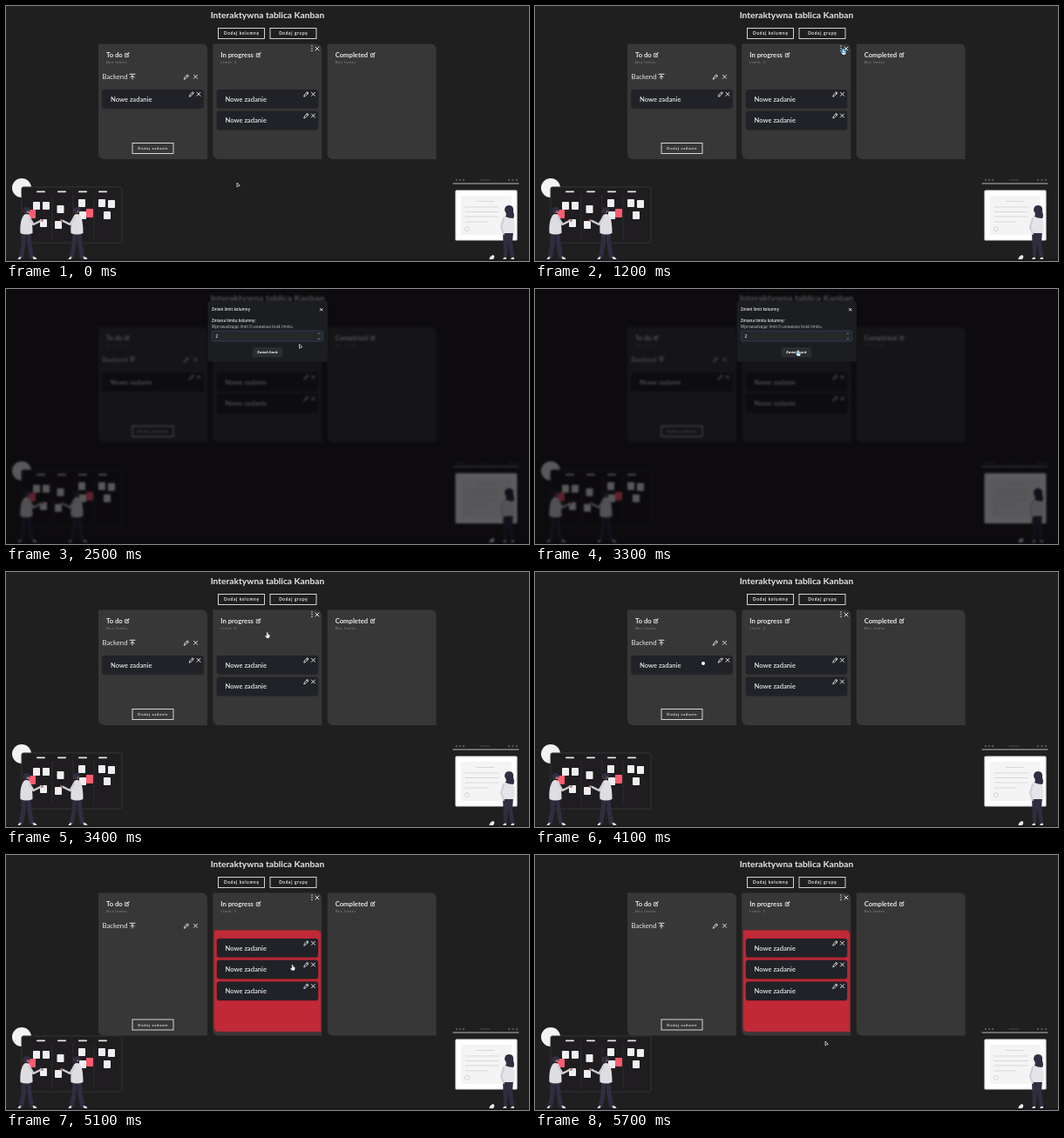
Write an HTML page that moves like this. It is 600 px wide and 293 px high and loops after 6.7 s.

```html
<!DOCTYPE html>
<html lang="pl">
<head>
<meta charset="utf-8">
<title>Interaktywna tablica Kanban</title>
<style>
html, body { margin: 0; width: 100%; height: 100%; overflow: hidden; background: #201f20; }
svg { display: block; width: 100%; height: 100%; font-family: Lato, sans-serif; }
.dimmed { filter: blur(1px); }
.modal { font-family: "Open Sans", sans-serif; }
</style>
</head>
<body>
<svg id="stage" viewBox="0 0 600 293"></svg>
<script>
const LOOP = 6700, STEP = 100;
const PITCH = 24.7, CARD_Y = 96;
const LIGHT = '#e6e6e6', NAVY = '#2f2e41', SKIN = '#a8777c', RED = '#ff5c70';
const stage = document.getElementById('stage');

const rect = (x, y, w, h, fill, extra = '') =>
  `<rect x="${x}" y="${y}" width="${w}" height="${h}" fill="${fill}" ${extra}/>`;
const circle = (x, y, r, fill, extra = '') =>
  `<circle cx="${x}" cy="${y}" r="${r}" fill="${fill}" ${extra}/>`;
const shape = (d, fill, extra = '') => `<path d="${d}" fill="${fill}" ${extra}/>`;
const line = (d, color, width, extra = '') =>
  shape(d, 'none', `stroke="${color}" stroke-width="${width}" stroke-linecap="round" stroke-linejoin="round" ${extra}`);
const text = (str, x, y, size, weight = 400, fill = LIGHT, extra = '') =>
  `<text x="${x}" y="${y}" font-size="${size}" font-weight="${weight}" fill="${fill}" ${extra}>${str}</text>`;
const at = (x, y, body, extra = '') => `<g transform="translate(${x} ${y})" ${extra}>${body}</g>`;

const cross = (x, y, r = 2, color = LIGHT) =>
  line(`M${x - r} ${y - r}l${2 * r} ${2 * r}m0 ${-2 * r}l${-2 * r} ${2 * r}`, color, 1);
const pencil = (x, y) => at(x, y, line('M-2.6 2.6l.5-1.8L1.2-2.5l1.3 1.3L-.8 2.1zM.4-1.7l1.3 1.3', LIGHT, .9));
const editIcon = (x, y) => at(x, y,
  line('M0-1.4h-2.2v3.9h3.9V.4', LIGHT, .8) + line('M-.4.7L2.3-2', LIGHT, 1.2));

// Piecewise eased track: rows of [time, ...values]
function track(rows, t) {
  const next = rows.findIndex(row => row[0] > t);
  if (next < 0) return rows.at(-1).slice(1);
  if (next === 0) return rows[0].slice(1);
  const a = rows[next - 1], b = rows[next];
  const k = (t - a[0]) / (b[0] - a[0]), ease = k * k * (3 - 2 * k);
  return a.slice(1).map((v, i) => v + (b[i + 1] - v) * ease);
}

const POINTER = [
  [0, 265, 203], [300, 265, 203], [1000, 354, 52], [1500, 354, 52],
  [1600, 351, 49], [2100, 359, 57], [2200, 359, 57], [2900, 302, 73], [3300, 302, 73],
  [3400, 300, 72], [3600, 300, 72], [4000, 193, 105], [4100, 193, 105],
  [4300, 218, 104], [4500, 301, 100], [4700, 325, 105], [4900, 325, 105],
  [5500, 340, 197], [5700, 333, 214]
];

// Room opening in the middle column for the dragged card
const GAP = [[4400, 0], [4500, 17], [4600, PITCH]];

function button(x, y, w, h, label, size) {
  return rect(x, y, w, h, 'none', `stroke="${LIGHT}" stroke-width=".9"`) +
    text(label, x + w / 2 + .3, y + h / 2 + 1.6, size, 700, LIGHT, 'text-anchor="middle" letter-spacing=".7"');
}

// Panel rounded at the top right and bottom left
function panel(x, y, w, h, r, fill, extra) {
  return shape(`M${x} ${y}h${w - r}q${r} 0 ${r} ${r}v${h - r}h${r - w}q${-r} 0 ${-r} ${-r}z`, fill, extra);
}

function column(x, height, title, limit, iconX) {
  return panel(x, 43.5, 125, height, 7, '#383738') +
    text(title, x + 9, 59, 7.7, 700) + editIcon(iconX, 56) +
    text(limit, x + 9, 65.6, 4.6, 400, '#858485', 'letter-spacing=".4"');
}

function card(x, y, extra = '') {
  return at(x, y,
    rect(-.8, -.3, 117.6, 22.8, '#000', 'rx="3.5" opacity=".18"') +
    rect(0, 0, 116, 21.5, '#202227', 'rx="3"') +
    text('Nowe zadanie', 9.5, 13.7, 7.6, 600) + pencil(102.5, 5.2) + cross(110.5, 5.3), extra);
}

function person(x, lean) {
  return at(x, 0,
    line('M-2.5 260L-3.5 274L-6 288M2.5 260L3.5 274L6 288', NAVY, 5) +
    shape('M-7 291h-3q1-3 4-3zM8 291h4q-1-3-5-3z', '#e4e4e4') +
    shape('M-3 240q3-2 6 0q4 4 4 21q-7 3-14 0q-1-14 4-21z', '#dedee2') +
    line(`M${lean * 3} 243L${lean * 8} 251L${lean * 16} 247`, '#cfcfd5', 2.5) +
    circle(lean * 18, 246.5, 1.4, SKIN) +
    circle(lean, 235, 3, SKIN) +
    shape('M-4 237q-1-6 4-6q5 0 4 5l-3-1l-2 4z', NAVY));
}

function teamBoard() {
  const notes = [[31, 225], [42, 225], [58.5, 229], [83, 222], [84, 236], [106, 222], [117, 223],
    [112, 236], [39, 245], [56, 247]];
  return circle(18, 209, 11, '#f3f3f3') +
    rect(18, 208, 115, 64, '#1f1d1f', 'rx="2" stroke="#343337" stroke-width="1"') +
    [53, 77, 101].map(x => line(`M${x} 217V268`, '#38363b', .7)).join('') +
    [35, 59, 83, 106].map(x => rect(x, 212.5, 10, 1.7, LIGHT, 'rx=".8"')).join('') +
    notes.map(([x, y]) => rect(x, y, 8, 9, '#efeef0', 'rx=".8"')).join('') +
    rect(26, 234, 8, 10, RED, 'rx=".8"') + rect(92, 233, 8, 10, RED, 'rx=".8"') +
    person(23.5, 1) + person(81.5, -1);
}

function reader() {
  const rows = [[540, 560, 224.5], [527, 565, 231], [527, 565, 236.5], [527, 565, 242], [527, 552, 248]];
  return line('M513 204H588', '#b9b9bb', 1) +
    [517, 521, 525, 577, 581.5, 586].map(x => circle(x, 200, 1.2, '#55535a')).join('') +
    line('M544 200H555', '#49474c', 1) +
    rect(516, 212, 70, 57, '#fff', 'rx="1" stroke="#e2e2e5" stroke-width="1.2"') +
    rect(522, 218, 58, 45, '#f4f4f5') +
    rows.map(([a, b, y]) => line(`M${a} ${y}H${b}`, '#d0d0d4', .8)).join('') +
    circle(529, 256, 2.6, 'none', 'stroke="#d0d0d4" stroke-width=".8"') +
    shape('M570 259h12l-1 13l2 17h-4l-3-17l-1 17h-4z', NAVY) +
    shape('M572 241h8q5 5 3 20h-13q-4-13 2-20z', '#e4e4e9') +
    line('M571 244L568 254L571 262', '#cdcdd4', 2) +
    shape('M572 235q0-6 5-6q6 0 5 7q2 6 0 8q-5 0-9-2q2-3-1-7z', NAVY) +
    shape('M570 291q1-3 4-2v2zM579 291q1-3 4-2v2z', '#e4e4e4') +
    shape('M554 292q1-5 5-6q3 2-1 6z', '#e8e8e8');
}

function board(t, px, py) {
  const lifted = t >= 4200, overLimit = t >= 4900;
  const height = overLimit ? 164 : 132.5;
  const [shift] = track(GAP, t);
  return text('Interaktywna tablica Kanban', 300, 14.3, 10.25, 700, LIGHT, 'text-anchor="middle"') +
    button(243.5, 25.5, 53, 12, 'Dodaj kolumnę', 4.7) +
    button(303, 25.5, 53, 12, 'Dodaj grupę', 4.7) +
    teamBoard() + reader() +
    column(106, height, 'To do', 'Bez limitu', 138.7) +
    column(237.3, height, 'In progress', t < 3400 ? 'Limit: 3' : 'Limit: 2', 289.5) +
    column(368.7, height, 'Completed', 'Bez limitu', 420.7) +
    [46, 48.7, 51.4].map(y => circle(351, y, .75, LIGHT)).join('') + cross(357, 49) +
    text('Backend', 110.5, 83.8, 7.75) +
    line('M142 78.3h6M145 84v-4m-2.2 2l2.2-2.2l2.2 2.2', LIGHT, 1) +
    pencil(207, 81.3) + cross(217.5, 81.3) +
    button(145, overLimit ? 189 : 157.5, 47, 12, 'Dodaj zadanie', 4.1) +
    (overLimit ? panel(238.8, 86.5, 122.4, 116.5, 5, '#c12936', 'stroke="#8f2932" stroke-width=".8"') : '') +
    (overLimit ? card(242, CARD_Y) : '') +
    card(242, CARD_Y + shift) + card(242, CARD_Y + PITCH + shift) +
    (lifted ? '' : card(110.5, CARD_Y)) +
    line('M0 291.6H600', '#131719', 1) +
    (lifted && !overLimit ? card(px - 83, py - 9, 'opacity=".6"') : '');
}

function modal(t) {
  const edited = t >= 2200;
  return rect(0, 0, 600, 293, '#020004', 'opacity=".64"') + '<g class="modal">' +
    rect(231.5, 14, 137.5, 69.5, '#1b1d20', 'rx="3"') +
    text('Zmień limit kolumny', 236, 25.3, 4.45, 600) +
    (edited ? '' : rect(357.5, 19.5, 8.5, 8.5, '#171b22', 'rx="1.8" stroke="#3f74b5" stroke-width="1"')) +
    cross(361.7, 23.7, 1.3) +
    text('Zmiana limitu kolumny:', 236, 37.8, 4.45, 600) +
    text('Wprowadzając limit 0 ustawiasz brak limitu.', 236, 44.6, 4.65, 400, '#c4c5c6') +
    rect(236.3, 48, 127.4, 12, '#25272b', `rx="1.5" stroke="${edited ? '#2c4a70' : '#2a2d31'}" stroke-width=".7"`) +
    text(edited ? 2 : 3, 240.5, 55.8, 4.7, 600) +
    line('M357.9 51.5l1.1-1.1l1.1 1.1M357.9 56.7l1.1 1.1l1.1-1.1', '#b8b8b8', .6) +
    rect(283, 67, 34, 11.5, '#2b2d31', 'rx="2.5"') +
    text('Zmień limit', 300, 74.2, 4.1, 700, '#fff', 'text-anchor="middle"') + '</g>';
}

function pointer(t, x, y) {
  const arrow = shape('M0 0v5l1.2-1l2.2-.5z', '#222', 'stroke="#ddd" stroke-width=".8"');
  const hand = shape('M-1-2.5q.9-.9 1.5 0v2l2 .5q.7 2-.6 4h-2.8l-2-2.5q.2-.8 1.9 0z', '#fff', 'stroke="#333" stroke-width=".3"');
  const busyHand = hand + circle(.3, -.4, 2.1, 'none', 'stroke="#38a8e8" stroke-width="1.1"');
  const linkHand = hand + circle(.8, 1, 1, '#48b4ee');
  const beam = line('M-.8-3h1.6M0-3v6M-.8 3h1.6', '#e0e0e0', .8);
  const fist = circle(0, 0, 2, '#fff');
  let glyph = arrow;
  if (t >= 1200 && t < 1600) glyph = busyHand;
  else if (t >= 1600 && t < 2000) glyph = beam;
  else if (t >= 2800 && t < 3400) glyph = linkHand;
  else if (t >= 3400 && t < 4100) glyph = hand;
  else if (t >= 4100 && t < 4900) glyph = fist;
  else if (t >= 4900 && t < 5500) glyph = hand;
  return at(x, y, glyph);
}

function render(t) {
  const [x, y] = track(POINTER, t);
  const open = t >= 1600 && t < 3400;
  stage.innerHTML = rect(0, 0, 600, 293, '#201f20') +
    `<g class="${open ? 'dimmed' : ''}">${board(t, x, y)}</g>` +
    (open ? modal(t) : '') + pointer(t, x, y);
}

const start = performance.now();
let shown = -1;
function tick() {
  const t = Math.floor((performance.now() - start) % LOOP / STEP) * STEP;
  if (t !== shown) render(shown = t);
  requestAnimationFrame(tick);
}
tick();
</script>
</body>
</html>
```
